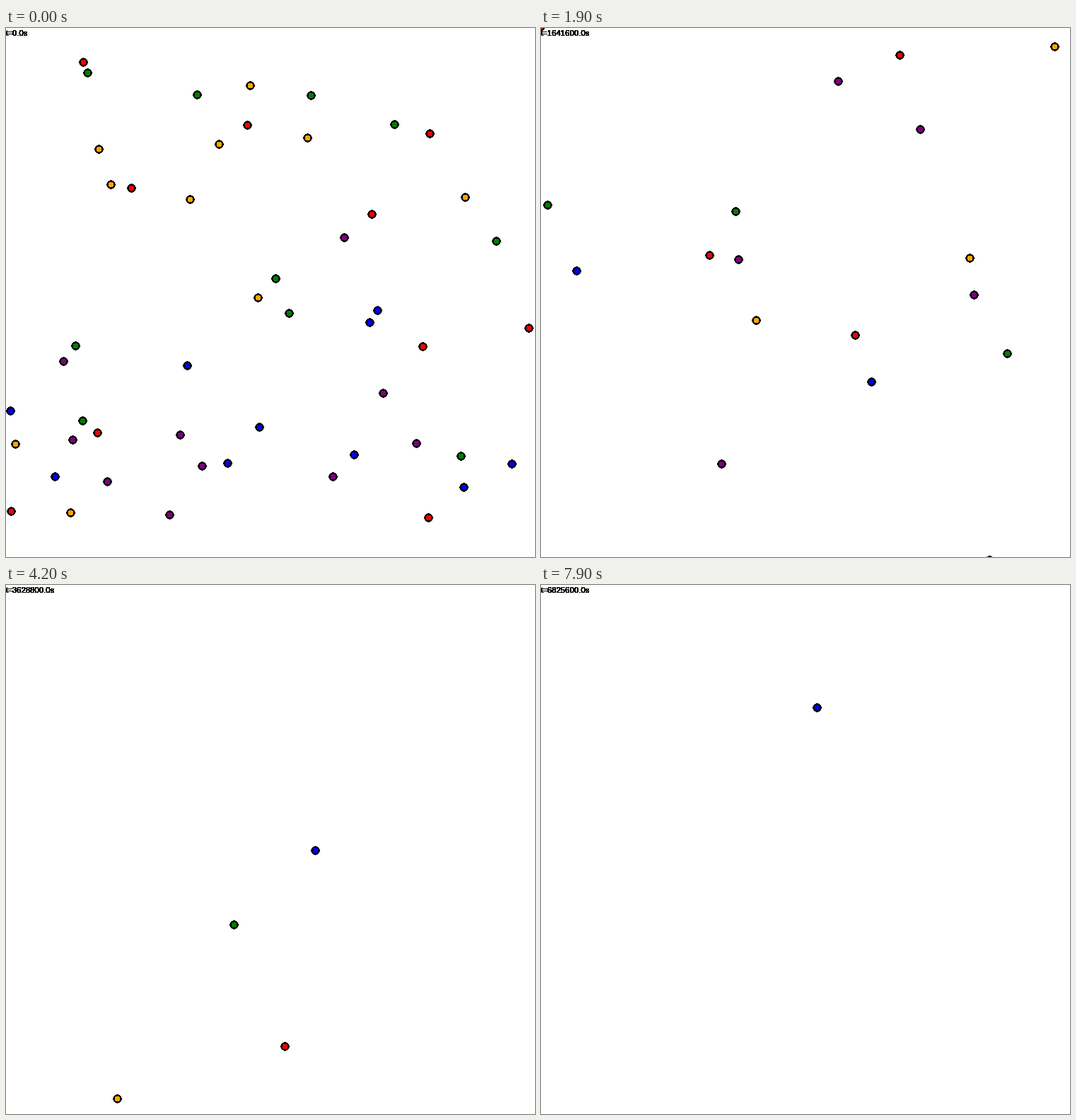
A matplotlib script for the animation above (8000 ms loop, 748 by 748 pixels).

```python
import numpy as np
import matplotlib.pyplot as plt
from matplotlib.animation import FuncAnimation

SIZE, DPI = 748, 100
FRAMES, INTERVAL = 80, 100
STEP = 86400.0          # simulated seconds per frame
PX = 72 / DPI
MID = SIZE / 2
RING = 540              # radius around the middle that lies off the stage

rng = np.random.default_rng(5)
start, speed, swerve, colors = [], [], [], []


def drift(color, x, y, vx, vy, sway=(0, 0)):
    """Steady flight; sway is an early sideways push that soon fades."""
    start.append((x, y))
    speed.append((vx, vy))
    swerve.append(sway)
    colors.append(color)


def escape(color, *spots):
    """Fast particles that fly outwards and leave the stage early."""
    for x, y in spots:
        heading = np.arctan2(y - MID, x - MID) + rng.normal(0, 0.5)
        goal = MID + RING * np.array([np.cos(heading), np.sin(heading)])
        drift(color, x, y, *(goal - (x, y)) / rng.uniform(5, 18))


# Slow particles: start and velocity in pixels per frame.
drift("red", 109, 48, 6.8, 14.4)
drift("red", 341, 137, -18, -7.3)
drift("red", 739, 424, -5.5, 17.3)
drift("red", 129, 572, 19.9, -28.1)
drift("red", 7, 683, 23, -13.1)
drift("orange", 426, 155, -6.4, 13.6)
drift("orange", 301, 164, 16.1, 8.5)
drift("orange", 649, 239, 4.1, -11.2)
drift("green", 270.5, 94, 2.15, 9.67, sway=(-39, -20))
drift("green", 549, 136, -28.4, 6)
drift("green", 108, 555, 29, -5)
drift("purple", 478, 296, 7.1, 4.3)
drift("purple", 81, 471.5, 9.16, 7.64)
drift("purple", 533.5, 516.5, -13.35, -9.93)
drift("purple", 277.5, 619, 7.5, -28.6)
drift("purple", 143.5, 641, 20.7, -26.2)
drift("blue", 525, 399, -25, -2.9)
drift("blue", 492, 603.5, -1.29, -5.44)

escape("red", (599, 149), (177, 226), (517, 263), (589, 450), (597, 692))
escape("orange", (345, 81), (131, 171), (148, 221), (260, 242), (356, 381),
       (13, 588), (91, 685))
escape("green", (115, 63), (431, 95), (693, 301), (381, 354), (400, 403),
       (98, 449), (643, 605))
escape("purple", (94, 582), (246, 575), (231, 688), (580, 587), (462, 634))
escape("blue", (514, 416), (256, 477), (6, 541), (358, 564), (313, 615),
       (69, 634), (715, 616), (647, 649))

start, speed, swerve = map(np.array, (start, speed, swerve))

fig = plt.figure(figsize=(SIZE / DPI, SIZE / DPI), dpi=DPI, facecolor="white")
ax = fig.add_axes([0, 0, 1, 1])
ax.set_xlim(0, SIZE)
ax.set_ylim(SIZE, 0)
ax.axis("off")

dots = ax.scatter(*start.T, s=(10 * PX) ** 2, c=colors, edgecolors="black",
                  linewidths=1.2 * PX, antialiaseds=False)
# The clock is printed many times over, which hardens its edges.
clock = [ax.text(0, 11, "", family="Liberation Sans", size=11.3 * PX,
                 color="black", va="baseline", zorder=5) for _ in range(30)]


def draw(f):
    pos = start + speed * f + swerve * (1 - np.exp(-f / 8))
    dots.set_offsets(np.floor(pos) + 0.5)
    for label in clock:
        label.set_text(f"t={f * STEP:.1f}s")
    return [dots, *clock]


anim = FuncAnimation(fig, draw, frames=FRAMES, interval=INTERVAL,
                     repeat=True, repeat_delay=0)
plt.show()
```
